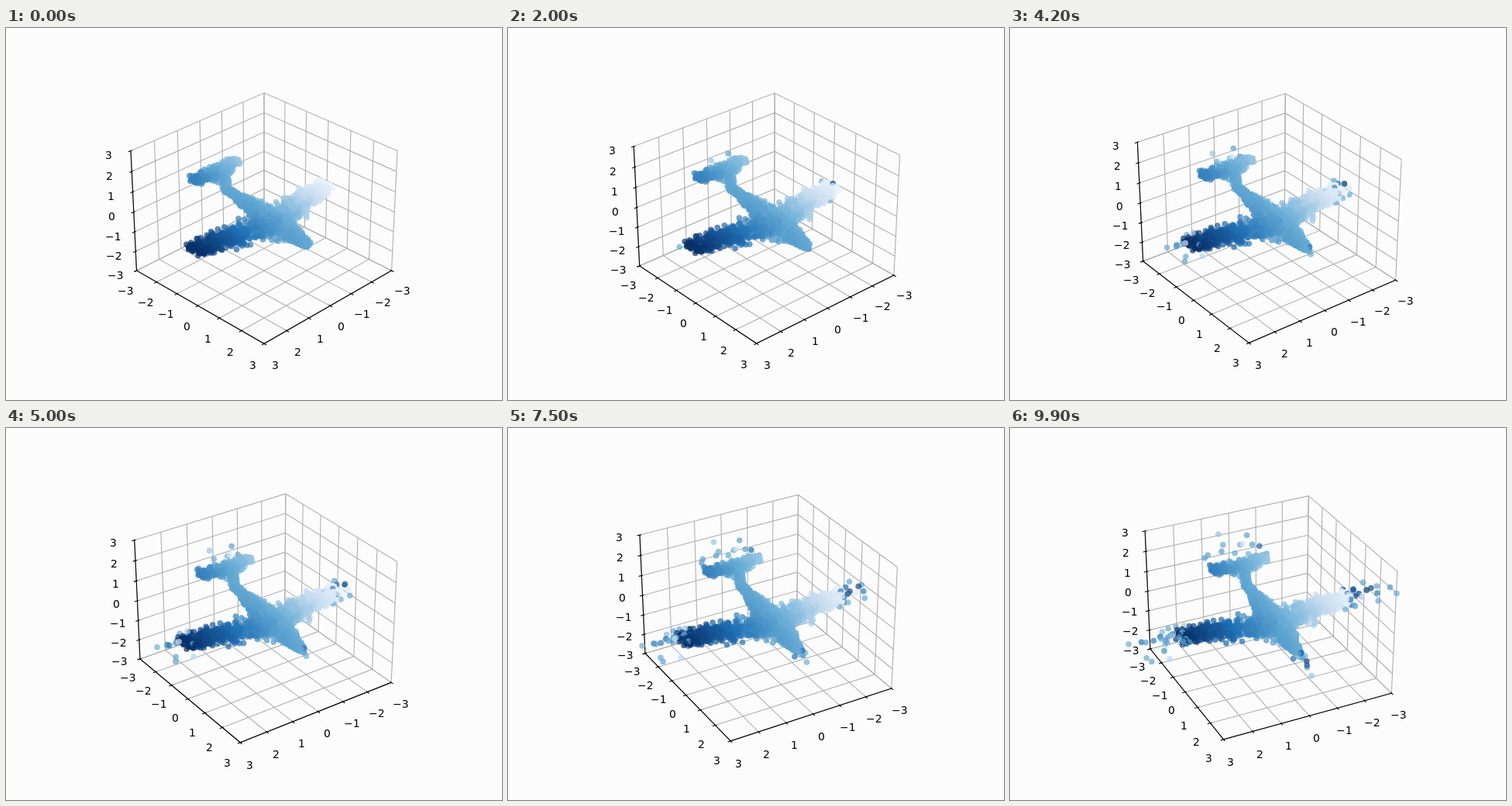
These frames come from a looping animation (640 px wide and 480 px high, 10000 ms). An HTML page with a canvas:

```html
<!DOCTYPE html>
<html lang="en">
<head>
<meta charset="utf-8">
<title>Rotating point cloud</title>
<style>
html, body { margin: 0; width: 100%; height: 100%; overflow: hidden; background: #fcfcfc; }
canvas { display: block; }
</style>
</head>
<body>
<canvas id="stage" width="640" height="480"></canvas>
<script>
const ctx = document.getElementById('stage').getContext('2d');
const FRAMES = 100, STEP = 100, LIM = 3;

let seed = 7;
function rand() {
  seed = (seed * 1664525 + 1013904223) >>> 0;
  return seed / 4294967296;
}
const between = (a, b) => a + (b - a) * rand();
const mix = (a, b, k) => a + (b - a) * k;
const noise = s => (rand() + rand() + rand() - 1.5) * s;
const pick = list => list[Math.floor(rand() * list.length)];

// Sequential blue colour scale, 0 = light, 1 = dark
const blues = ['f7fbff', 'c6dbef', '6baed6', '2171b5', '08306b']
  .map(h => [0, 2, 4].map(i => parseInt(h.substr(i, 2), 16)));
function blue(v) {
  const s = Math.min(Math.max(v, 0), 1) * 4, i = Math.min(Math.floor(s), 3);
  return `rgb(${blues[i].map((c, k) => Math.round(mix(c, blues[i + 1][k], s - i)))})`;
}

// Aeroplane cloud: span along x, nose towards +y
const cloud = [], tips = [];
function add(x, y, z, isTip) {
  const point = { pos: [x, y, z], color: blue(0.54 + x * 0.155) };
  cloud.push(point);
  if (isTip) tips.push(point);
}
function addWings(count) {
  for (let i = 0; i < count; i++) {
    const k = between(0.05, 1), side = i % 2 ? 1 : -1;
    const y = between(mix(-0.05, -0.45, k), mix(1.05, 0.2, k));
    add(side * k * 3.05 + noise(0.1), y + noise(0.08), -0.27 + noise(mix(0.5, 0.14, k)), k > 0.8);
  }
}
function addBody(count) {
  for (let i = 0; i < count; i++) {
    const y = between(-2, 1.9), a = between(0, 2 * Math.PI);
    const taper = Math.min(0.13 + Math.max(0, y + 1.4) * 0.28, 0.42, 0.13 + (1.9 - y) * 0.3);
    const r = taper * Math.sqrt(rand());
    add(-0.1 + r * Math.cos(a), y, -0.27 - 0.19 * y + r * Math.sin(a), y > 1.8);
  }
}
function addTail(count) {
  for (let i = 0; i < count; i++) {
    const x = between(-1.05, 1), w = 0.4 - 0.22 * Math.abs(x);
    add(x - 0.08, -2.28 - 0.12 * Math.abs(x) + between(-w, w), 0.78 + noise(0.18), i % 4 === 0);
    if (i % 10 === 0) add(-0.1 + noise(0.1), between(-2.2, -1.75), between(0.15, 0.75));
  }
}
addWings(900);
addBody(780);
addTail(240);

// Points that jump to a tip at their own moment, then drift outwards
const drifters = new Map();
for (let i = 0; i < 115; i++) {
  drifters.set(pick(cloud), {
    home: pick(tips).pos.map(v => v + noise(0.15)),
    start: between(0.06, 1),
    reach: 0.08 + 0.55 * rand() ** 3
  });
}
function placeAt(point, t) {
  const d = drifters.get(point);
  return d && t >= d.start ? d.home.map(v => v * (1 + d.reach * t)) : point.pos;
}

// Perspective camera, 30 degrees above the floor
const SXY = 25 / 126, SZ = 25 / 168, SCALE = 1997.84;
const sinE = 0.5, cosE = Math.sqrt(3) / 2;
let sinA, cosA;
function project([x, y, z]) {
  const across = (y * cosA - x * sinA) * SXY, away = (x * cosA + y * sinA) * SXY, up = z * SZ;
  const depth = away * cosE + up * sinE, f = SCALE / (10 - depth);
  return [333 + across * f, 237.4 + (away * sinE - up * cosE) * f, depth];
}

function line(color, ...points) {
  ctx.strokeStyle = color;
  ctx.beginPath();
  points.forEach(p => ctx.lineTo(...project(p).slice(0, 2)));
  ctx.stroke();
}

function label(value, pos) {
  const text = String(value).replace('-', '\u2212'), [x, y] = project(pos);
  ctx.fillText(text, Math.round(x - ctx.measureText(text).width / 2), Math.round(y + 11));
}

function drawAxes() {
  const L = LIM, out = 3.1, inn = 2.95, far = 3.5;
  ctx.lineWidth = 1.11;
  for (let v = -L; v <= L; v++) {
    line('#b0b0b0', [v, L, -L], [v, -L, -L], [v, -L, L]);
    line('#b0b0b0', [L, v, -L], [-L, v, -L], [-L, v, L]);
    line('#b0b0b0', [L, -L, v], [-L, -L, v], [-L, L, v]);
  }
  line('#000', [L, -L, L], [L, -L, -L], [L, L, -L], [-L, L, -L]);
  ctx.fillStyle = '#000';
  ctx.font = '13.89px "DejaVu Sans", sans-serif';
  for (let v = -L; v <= L; v++) {
    line('#000', [v, out, -L], [v, inn, -L]);
    line('#000', [out, v, -L], [inn, v, -L]);
    line('#000', [out, -L, v], [inn, -L, v]);
    label(v, [v, far, -far]);
    label(v, [far, v, -far]);
    label(v, [far, -far, v]);
  }
}

function drawCloud(t) {
  const dots = cloud.map(p => ({ at: project(placeAt(p, t)), color: p.color }));
  dots.sort((a, b) => a.at[2] - b.at[2]);
  ctx.globalAlpha = 0.7;
  for (const { at, color } of dots) {
    ctx.fillStyle = color;
    ctx.beginPath();
    ctx.arc(at[0], at[1], 3.8, 0, 2 * Math.PI);
    ctx.fill();
  }
  ctx.globalAlpha = 1;
}

function draw(frame) {
  const azimuth = (45 + Math.floor(frame / 5)) * Math.PI / 180;
  sinA = Math.sin(azimuth);
  cosA = Math.cos(azimuth);
  ctx.fillStyle = '#fcfcfc';
  ctx.fillRect(0, 0, 640, 480);
  drawAxes();
  drawCloud(frame / (FRAMES - 1));
}

const began = performance.now();
let shown = -1;
function tick() {
  const frame = Math.floor((performance.now() - began) / STEP) % FRAMES;
  if (frame !== shown) draw(shown = frame);
  requestAnimationFrame(tick);
}
tick();
</script>
</body>
</html>
```
